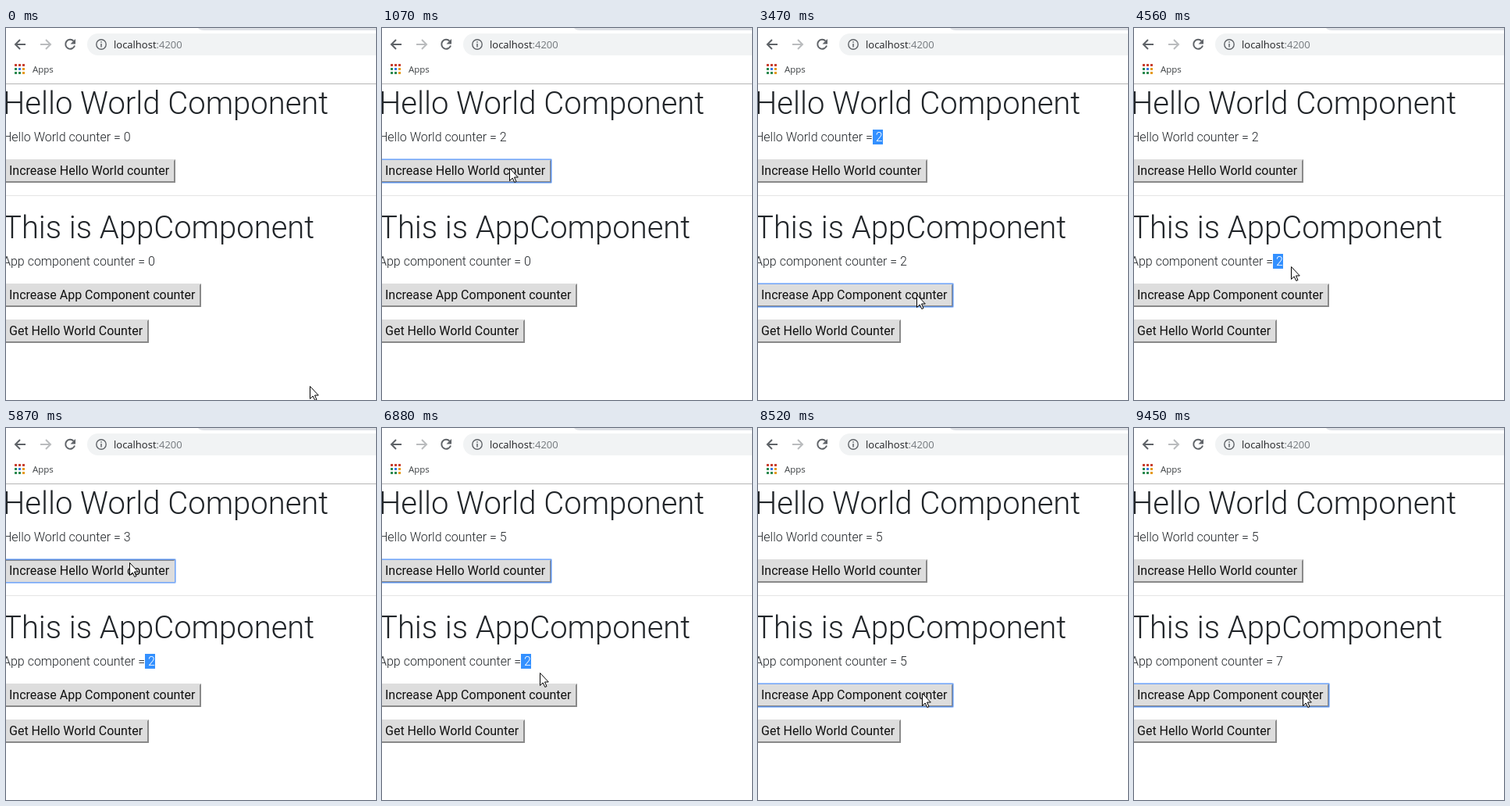
An HTML page that plays this animation: 474x476 px, repeating every 9530 ms.

```html
<!DOCTYPE html>
<html lang="en">
<head>
<meta charset="utf-8">
<title>Component counters</title>
<style>
  html, body { margin: 0; width: 100%; height: 100%; overflow: hidden; background: #fff; }
  #stage { position: relative; width: 474px; height: 476px; overflow: hidden; background: #fff; }
  .chrome { position: absolute; left: 0; top: 0; }
  .chrome text { font-family: "Open Sans", "Noto Sans", sans-serif; }
  #page {
    position: absolute; left: -4px; top: 72px; width: 600px;
    font: 300 16px/24px Roboto, sans-serif; color: #212529; white-space: pre;
  }
  h1, p { width: fit-content; }
  h1 { margin: 0 0 7px; padding-top: 1px; font-size: 40px; font-weight: 300; line-height: 48px; }
  p { margin: 0 0 16px; height: 24px; }
  hr { margin: 16px 0; border: 0; height: 1px; background: rgba(0, 0, 0, .1); }
  .btn {
    position: relative; box-sizing: border-box; height: 30px; margin-bottom: 16px; padding: 1px 6px;
    font-weight: 400; color: #111; background: #ddd;
    border: 2px solid; border-color: #ddd #898989 #898989 #ddd;
  }
  .btn.down { border-color: #898989 #ddd #ddd #898989; }
  .btn.focus::after {
    content: ""; position: absolute; inset: -2px; border-radius: 1px;
    box-shadow: 0 0 0 1px rgba(77, 144, 254, .5), inset 0 0 0 1px rgba(77, 144, 254, .7);
  }
  .sel { background: #3390ff; color: #fff; }
  #cursor { position: absolute; left: 0; top: 0; overflow: visible; pointer-events: none; }
  #beam, .text #arrow { display: none; }
  .text #beam { display: inline; }
</style>
</head>
<body>
<div id="stage">
  <svg class="chrome" width="474" height="72">
    <path d="M246 0H474V3H254Q248 3 246 0Z" fill="#dee1e6"/>
    <rect x="104" y="7" width="400" height="28" rx="14" fill="#f1f3f4"/>
    <g fill="none" stroke="#5f6368" stroke-width="2">
      <path d="M25 21H12.5M18 15L12 21L18 27"/>
      <path d="M44 21H56.5M51 15L57 21L51 27" stroke="#babcbe"/>
      <path d="M86.6 16.6A6 6 0 1 0 88 22.5"/>
      <circle cx="122" cy="21" r="6.2" stroke-width="1.4"/>
      <path d="M122 20V24.5M122 17.2V18.8" stroke-width="1.5"/>
    </g>
    <path d="M89 14V20.5H82.5Z" fill="#5f6368"/>
    <text x="138" y="26" font-size="13" fill="#202124">localhost<tspan fill="#74797e">:4200</tspan></text>
    <g id="dots"></g>
    <text x="34" y="57" font-size="11.5" fill="#3c4043">Apps</text>
    <rect y="71" width="474" height="1" fill="#b6b6b6"/>
  </svg>

  <div id="page"><h1>Hello World Component</h1><p>Hello World counter =<span id="helloNum"> 0</span></p><div class="btn" id="helloBtn" style="width:221px">Increase Hello World counter</div><hr><h1>This is AppComponent</h1><p>App component counter =<span id="appNum"> 0</span></p><div class="btn" id="appBtn" style="width:254px">Increase App Component counter</div><div class="btn" style="width:187px">Get Hello World Counter</div></div>

  <svg id="cursor" width="12" height="19">
    <path id="arrow" d="M.5 .5V16.5L4.2 13L6.8 18.5L9 17.5L6.5 12H11.3Z" fill="#fff" stroke="#000"/>
    <path id="beam" d="M-3 -7.5H-1M1 -7.5H3M0 -7V7M-3 7.5H-1M1 7.5H3" fill="none" stroke="#000"/>
  </svg>
</div>

<script>
const LOOP = 9530, TICK = 75, HOLD = 80;
const $ = id => document.getElementById(id);

// Apps icon: red row above green, blue and yellow
const dotColor = (row, col) =>
  row === 0 ? "#c8402f" : col === 2 ? "#e59a1a" : row === 1 && col === 1 ? "#3b78e7" : "#2b8a50";
for (let i = 0; i < 9; i++) {
  const col = i % 3, row = (i - col) / 3;
  $("dots").innerHTML +=
    `<rect x="${11 + col * 5}" y="${46 + row * 5}" width="3" height="3" fill="${dotColor(row, col)}"/>`;
}

// The pointer glides to each stop in a number of ticks.
const stop = (at, ticks, x, y) => ({ at, ticks, x, y });
const stops = [
  stop(70, 7, 163, 179),
  stop(1450, 6, 147, 140),
  stop(1990, 2, 158, 135),
  stop(2300, 5, 192, 294),
  stop(2710, 5, 203, 341),
  stop(3540, 11, 186, 298),
  stop(4390, 1, 201, 305),
  stop(4630, 2, 224, 292),
  stop(4860, 9, 158, 172),
  stop(6500, 8, 210, 339),
  stop(9450, 1, 216, 339)
];

const every = (start, gap, n) => Array.from({ length: n }, (_, i) => start + i * gap);
const helloClicks = [...every(670, 320, 2), ...every(5550, 315, 3)];
const appClicks = [...every(3070, 310, 2), ...every(7110, 473, 5)];

const within = (t, a, b) => t >= a && t < b;
const ease = u => u * u * (3 - 2 * u);

function pointer(t) {
  let x = 389, y = 458;
  for (const s of stops) {
    if (t < s.at) break;
    const u = ease(Math.min(1, (Math.floor((t - s.at) / TICK) + 1) / s.ticks));
    x += (s.x - x) * u;
    y += (s.y - y) * u;
  }
  return [Math.round(x), Math.round(y)];
}

function counter(name, t, clicks, focused, selected) {
  const num = $(name + "Num"), btn = $(name + "Btn");
  num.textContent = " " + clicks.filter(c => t >= c + HOLD).length;
  num.className = selected ? "sel" : "";
  btn.classList.toggle("focus", focused);
  btn.classList.toggle("down", clicks.some(c => within(t, c, c + HOLD)));
}

function draw(t) {
  counter("hello", t, helloClicks, within(t, 670, 1990) || within(t, 5550, 7110), within(t, 2070, 4090));
  counter("app", t, appClicks, within(t, 3070, 4090) || t >= 7110, within(t, 4250, 7190));
  const [x, y] = pointer(t);
  const under = document.elementFromPoint(x, y);
  $("cursor").style.transform = `translate(${x}px, ${y}px)`;
  $("cursor").classList.toggle("text", !!under && !!under.closest("h1, p"));
}

const begin = performance.now();
function tick() {
  draw((performance.now() - begin) % LOOP);
  requestAnimationFrame(tick);
}
tick();
</script>
</body>
</html>
```
